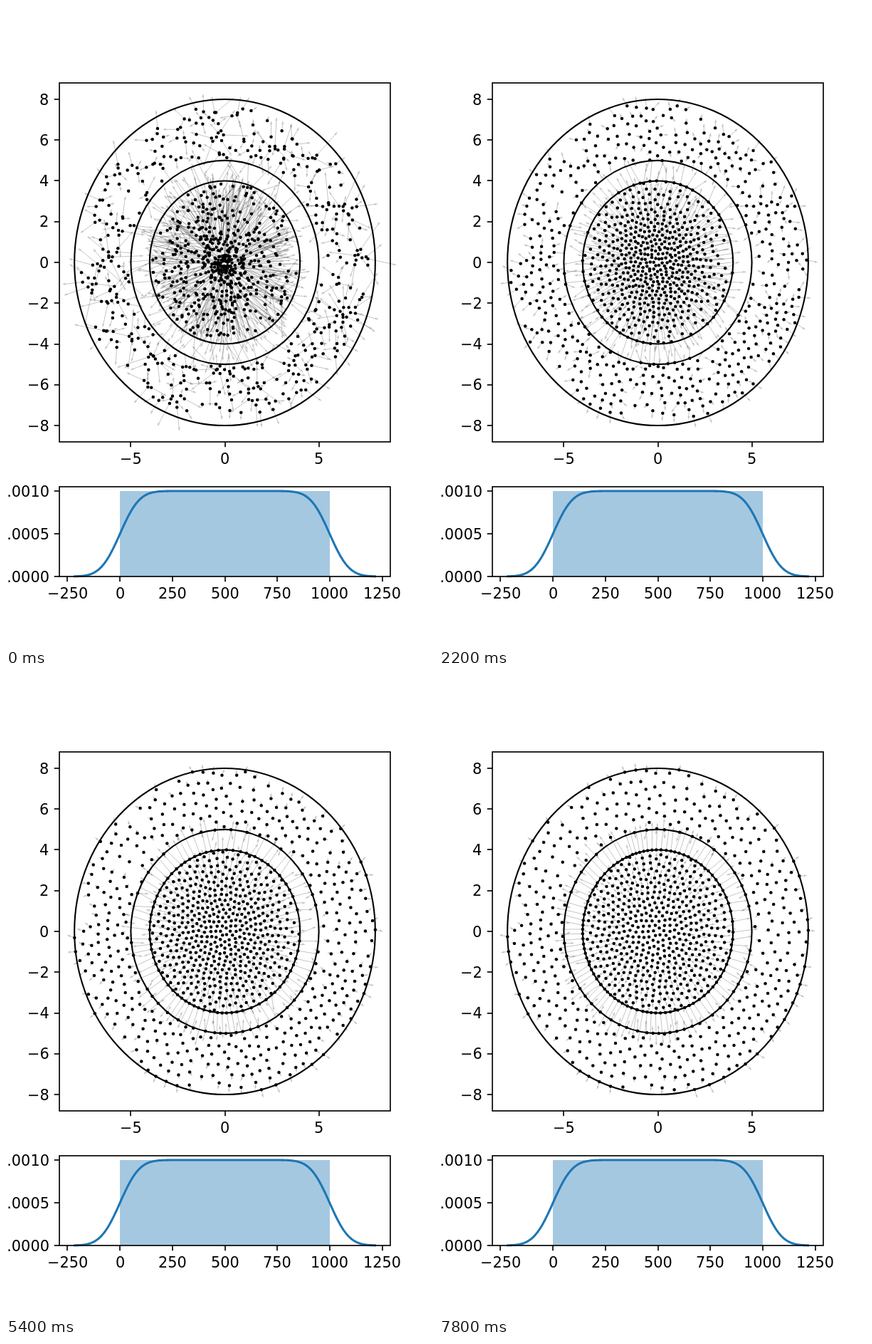
Recreate the animation shown at these times as an HTML page with a canvas. Size 600 px wide and 900 px high, loop 8 s.

```html
<!DOCTYPE html>
<html lang="en">
<head>
<meta charset="utf-8">
<title>Repelling particles</title>
<style>
  html, body { margin: 0; width: 100%; height: 100%; overflow: hidden; background: #fff; }
  canvas { display: block; width: 100%; height: 100%; }
</style>
</head>
<body>
<canvas id="stage" width="600" height="900"></canvas>
<script>
const ctx = document.getElementById('stage').getContext('2d');
const STEP_MS = 200, STEPS = 40;
const RATE = 0.0028;        // movement per unit of force
const ARROW = 0.1;          // arrow length per unit of force
const MAX_FORCE = 30;
const SOFTENING = 0.04;
const RANGE = 0.9;          // distance over which the repulsion fades

const plotX = x => 307.5 + x * 26.42;
const plotY = y => 360 - y * 28.63;
const histX = v => 160.2 + v * 0.2948;
const histY = p => 801 - p * 120000;

let seed = 20417;
function random() {
  seed = (seed + 0x6D2B79F5) | 0;
  let t = Math.imul(seed ^ (seed >>> 15), 1 | seed);
  t = (t + Math.imul(t ^ (t >>> 7), 61 | t)) ^ t;
  return ((t ^ (t >>> 14)) >>> 0) / 4294967296;
}

// Particles spread evenly over radius, so they crowd towards the centre
function makeGroup(count, inner, outer, from, to) {
  const points = Array.from({ length: count }, () => {
    const r = from + (to - from) * random(), a = 2 * Math.PI * random();
    return { x: r * Math.cos(a), y: r * Math.sin(a), fx: 0, fy: 0 };
  });
  return { points, inner, outer };
}

// Screened inverse-square repulsion between all members of a group
function computeForces(points) {
  for (const p of points) p.fx = p.fy = 0;
  for (let i = 0; i < points.length; i++) {
    const p = points[i];
    for (let j = 0; j < i; j++) {
      const q = points[j], dx = p.x - q.x, dy = p.y - q.y;
      const d2 = dx * dx + dy * dy + SOFTENING, d = Math.sqrt(d2);
      if (d > RANGE * 5) continue;
      const k = Math.exp(-d / RANGE) / (d2 * d);
      p.fx += dx * k; p.fy += dy * k;
      q.fx -= dx * k; q.fy -= dy * k;
    }
  }
  for (const p of points) {
    const k = Math.min(1, MAX_FORCE / (Math.hypot(p.fx, p.fy) || 1));
    p.fx *= k; p.fy *= k;
  }
}

function advance({ points, inner, outer }) {
  for (const p of points) {
    p.x += p.fx * RATE;
    p.y += p.fy * RATE;
    const r = Math.hypot(p.x, p.y) || 1;
    const k = Math.min(outer, Math.max(inner, r)) / r;
    p.x *= k; p.y *= k;
  }
  computeForces(points);
}

function simulate() {
  const groups = [makeGroup(555, 0, 4, 0, 3.85), makeGroup(430, 5, 8, 5.15, 7.65)];
  groups.forEach(g => computeForces(g.points));
  return Array.from({ length: STEPS }, () => {
    groups.forEach(advance);
    return groups.flatMap(g => g.points.map(p => ({ ...p })));
  });
}

function line(x1, y1, x2, y2) {
  ctx.beginPath();
  ctx.moveTo(x1, y1);
  ctx.lineTo(x2, y2);
  ctx.stroke();
}

function drawArrow(p) {
  const x = plotX(p.x), y = plotY(p.y);
  const dx = p.fx * ARROW * 26.42, dy = -p.fy * ARROW * 28.63;
  const length = Math.hypot(dx, dy);
  if (length < 2) return;
  const ux = dx / length, uy = dy / length, head = Math.min(5, length);
  const bx = x + dx - ux * head, by = y + dy - uy * head;
  line(x, y, bx, by);
  ctx.beginPath();
  ctx.moveTo(x + dx, y + dy);
  ctx.lineTo(bx - uy * 1.5, by + ux * 1.5);
  ctx.lineTo(bx + uy * 1.5, by - ux * 1.5);
  ctx.fill();
}

function drawParticles(points) {
  ctx.strokeStyle = ctx.fillStyle = 'rgba(0,0,0,0.23)';
  ctx.lineWidth = 1;
  points.forEach(drawArrow);

  ctx.fillStyle = '#000';
  for (const p of points) {
    ctx.beginPath();
    ctx.arc(plotX(p.x), plotY(p.y), 2.25, 0, 2 * Math.PI);
    ctx.fill();
  }
  ctx.strokeStyle = '#000';
  ctx.lineWidth = 2.08;
  for (const r of [4, 5, 8]) {
    ctx.beginPath();
    ctx.ellipse(plotX(0), plotY(0), r * 26.42, r * 28.63, 0, 0, 2 * Math.PI);
    ctx.stroke();
  }
}

function normalCdf(z) {
  return 1 / (1 + Math.exp(-1.5976 * z - 0.07056 * z ** 3));
}

function drawDistribution() {
  ctx.fillStyle = '#a5c8e1';
  ctx.fillRect(160, histY(0.001), 295, 120);
  ctx.strokeStyle = '#1f77b4';
  ctx.lineWidth = 3.1;
  ctx.lineJoin = 'round';
  ctx.beginPath();
  for (let v = -220; v <= 1220; v += 5) {
    const density = normalCdf(v / 73) - normalCdf((v - 999) / 73);
    ctx.lineTo(histX(v), histY(0.001 * density));
  }
  ctx.stroke();
}

const label = v => String(v).replace('-', '\u2212');

// Text sits on whole pixels; anchor 0.5 centres it, 1 aligns it right
function drawLabel(text, x, y, anchor) {
  ctx.fillText(text, Math.round(x - ctx.measureText(text).width * anchor), Math.round(y));
}

function drawAxes(top, bottom, xTicks, toX, yTicks, toY, yLabel) {
  ctx.strokeStyle = ctx.fillStyle = '#000';
  ctx.lineWidth = 1.67;
  ctx.lineJoin = 'miter';
  ctx.font = '20.83px "DejaVu Sans", sans-serif';
  ctx.strokeRect(75, top, 465, bottom - top);
  for (const v of xTicks) {
    const x = Math.round(toX(v));
    line(x, bottom, x, bottom + 7.3);
    drawLabel(label(v), toX(v), bottom + 31, 0.5);
  }
  for (const v of yTicks) {
    const y = Math.round(toY(v));
    line(75, y, 67.7, y);
    drawLabel(yLabel(v), 60.4, toY(v) + 7.7, 1);
  }
}

const states = simulate();

function draw(step) {
  ctx.fillStyle = '#fff';
  ctx.fillRect(0, 0, 600, 900);
  drawParticles(states[step]);
  drawAxes(108, 612, [-5, 0, 5], plotX,
    [-8, -6, -4, -2, 0, 2, 4, 6, 8], plotY, label);
  drawDistribution();
  drawAxes(675, 801, [-250, 0, 250, 500, 750, 1000, 1250], histX,
    [0, 0.0005, 0.001], histY, v => v.toFixed(4));
}

let shown = -1;
const start = performance.now();
function tick() {
  const step = Math.floor((performance.now() - start) / STEP_MS) % STEPS;
  if (step !== shown) draw(shown = step);
  requestAnimationFrame(tick);
}
tick();
</script>
</body>
</html>
```
